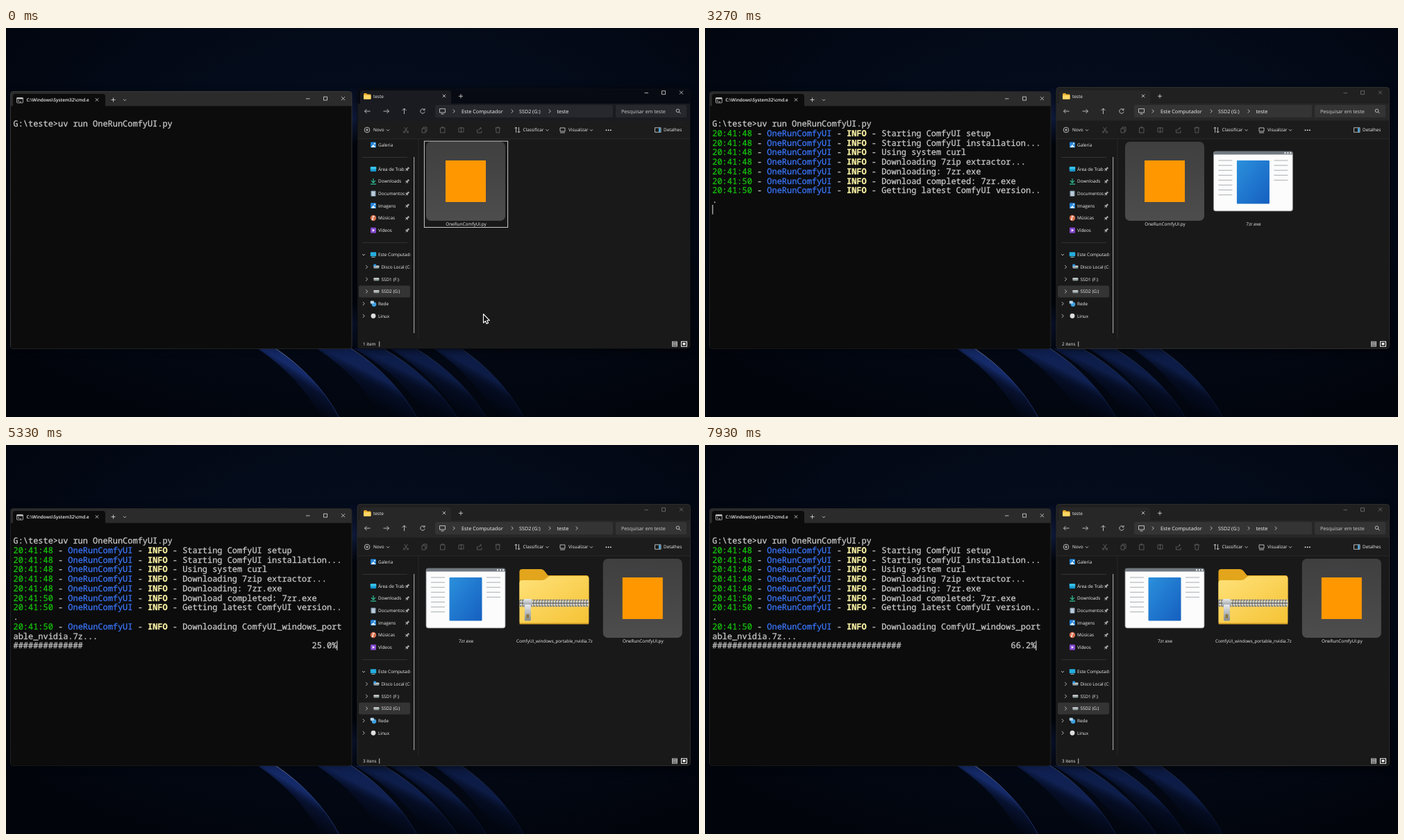
An HTML page for the animation above (8000 ms loop, 998 by 561 pixels).

```html
<!DOCTYPE html>
<html lang="pt">
<head>
<meta charset="utf-8">
<style>
html, body { margin: 0; width: 100%; height: 100%; overflow: hidden; background: #020610; }
svg { display: block; width: 998px; height: 561px; text-rendering: geometricPrecision; }
.ui { font-family: "Open Sans", "Noto Sans", sans-serif; fill: #f2f2f2; }
.mono { font-family: "Noto Sans Mono", "DejaVu Sans Mono", monospace; font-size: 11.945px;
  color: #ccc; fill: currentColor; stroke: currentColor; stroke-width: .25; }
.line { fill: none; stroke: #ddd; stroke-width: .8; }
.dim { stroke: #666; }
</style>
</head>
<body>
<svg id="stage" viewBox="0 0 998 561">
  <defs>
    <radialGradient id="sky" cx=".55" cy=".35" r=".75">
      <stop stop-color="#061023"/><stop offset=".6" stop-color="#030916"/><stop offset="1" stop-color="#01040b"/>
    </radialGradient>
    <linearGradient id="petal" x1=".4" y1=".72" x2=".62" y2=".42">
      <stop stop-color="#081336" stop-opacity="0"/><stop offset=".7" stop-color="#0b1842" stop-opacity=".6"/>
      <stop offset="1" stop-color="#152a68"/>
    </linearGradient>
    <linearGradient id="rim" gradientUnits="userSpaceOnUse" x1="0" y1="463" x2="0" y2="561">
      <stop stop-color="#8492bd"/><stop offset=".4" stop-color="#33498c"/><stop offset="1" stop-color="#1c3275"/>
    </linearGradient>
    <linearGradient id="gap" x2="0" y2="1">
      <stop stop-color="#060d20"/><stop offset=".12" stop-color="#14244f"/><stop offset=".22" stop-color="#03070f"/>
      <stop offset=".82" stop-color="#03070f"/><stop offset=".9" stop-color="#0c1736"/><stop offset="1" stop-color="#040914"/>
    </linearGradient>
    <linearGradient id="tile" x2="0" y2="1"><stop stop-color="#3f3f3f"/><stop offset="1" stop-color="#4d4d4d"/></linearGradient>
    <linearGradient id="blue" x2="1" y2="1"><stop stop-color="#2b90dc"/><stop offset="1" stop-color="#155fc0"/></linearGradient>
    <linearGradient id="yellow" x2="1" y2="1"><stop stop-color="#ffe27a"/><stop offset="1" stop-color="#f5c234"/></linearGradient>
    <linearGradient id="steel" x2="0" y2="1"><stop stop-color="#e8eaec"/><stop offset="1" stop-color="#858b91"/></linearGradient>
    <filter id="soft"><feGaussianBlur stdDeviation="7"/></filter>
    <clipPath id="pinned"><path d="M507 160h67v300h-67z"/></clipPath>
    <clipPath id="tree"><path d="M507 160h75.500v300h-75.500z"/></clipPath>
  </defs>
</svg>
<script>
const stage = document.getElementById('stage');
const COL = 7.167, ROW = 13.72, LEFT = 10.5, BASE = 142.3;

const rect = (x, y, w, h, fill, r = 0, extra = '') =>
  `<rect x="${x}" y="${y}" width="${w}" height="${h}" fill="${fill}" rx="${r}" ${extra}/>`;
const line = (d, cls = '') => `<path class="line ${cls}" d="${d}"/>`;
const group = (id, body, extra = '') => `<g id="${id}" ${extra}>${body}</g>`;
const label = (x, y, s, size = 6.4, extra = '') =>
  `<text class="ui" x="${x}" y="${y + size * .36}" font-size="${size}" ${extra}>${s}</text>`;
const mono = (col, row, s, extra = '') =>
  `<text class="mono" x="${LEFT + col * COL}" y="${BASE + row * ROW}" ${extra}>${s}</text>`;
const cross = (x, y, r) => line(`M${x - r} ${y - r}l${2 * r} ${2 * r}m0 ${-2 * r}l${-2 * r} ${2 * r}`);
const plus = (x, y) => line(`M${x - 3} ${y}h6m-3 -3v6`);
const chevron = (x, y) => line(`M${x - 1.2} ${y - 2.5}l2.5 2.500l-2.500 2.500`);
const down = (x, y) => line(`M${x - 2} ${y - 1}l2 2l2 -2`);

// Each petal: top x, bottom x, width of its glow, strength.
function wallpaper() {
  const petals = [[388, 480, 26, 1], [497, 592, 50, .75], [543, 650, 42, .65], [590, 692, 38, .6], [655, 746, 40, .6]];
  const edge = (a, b) => `Q${a + (b - a) * .66} 503 ${b} 562`;
  return rect(0, 0, 998, 561, 'url(#sky)') + rect(496, 85, 14, 380, 'url(#gap)') +
    petals.map(([a, b, w, strength]) =>
      `<g opacity="${strength}">
        <path fill="url(#petal)" d="M${a} 462${edge(a, b)}H${b - w}Q${a + (b - a) * .66 - w} 503 ${a - w} 462z"/>
        <path fill="none" stroke="url(#rim)" stroke-width=".8" opacity="${strength}" d="M${a} 462${edge(a, b)}"/></g>`).join('') +
    rect(506, 90, 479, 374, '#000', 4, 'filter="url(#soft)" opacity=".75"') +
    rect(7, 94, 491, 369, '#000', 4, 'filter="url(#soft)" opacity=".4"');
}

function terminal() {
  return rect(6.5, 91.5, 491.500, 371, '#2b2b2b', 4, 'id="termFrame" stroke="#444" stroke-width=".8"') +
    `<path fill="#0c0c0c" d="M7 112.500H497.500V459q0 3.500-3.500 3.500H10.500q-3.500 0-3.500-3.500z"/>
     <path fill="#0c0c0c" d="M10 113V99q0-4 4-4H139q4 0 4 4v14z"/>` +
    rect(15.5, 100.5, 9, 7.5, '#111', 1, 'stroke="#bbb" stroke-width=".8"') +
    rect(15.5, 100.5, 9, 2, '#ccc') + line('M17 104l1.500 1.200l-1.500 1.200m2.500 .2h2.500') +
    label(29.5, 104, 'C:\\Windows\\System32\\cmd.e', 6.45, 'font-weight="600"') +
    cross(131, 103.5, 2.2) + plus(154.5, 103.5) + down(171, 103.8) +
    line('M432 102h5.500M457.500 99.200h5v5h-5z') + cross(485.5, 101.7, 2.5) +
    mono(0, 0, 'G:\\teste&gt;uv run OneRunComfyUI.py');
}

const entry = (row, time, msg) =>
  mono(0, row, time, 'style="color:#16c60c"') + mono(9, row, '-') +
  mono(11, row, 'OneRunComfyUI', 'style="color:#3b78ff"') + mono(25, row, '-') +
  mono(27, row, 'INFO', 'style="color:#f9f1a5" font-weight="600"') + mono(32, row, '-') + mono(34, row, msg);

function log() {
  const setup = ['Starting ComfyUI setup', 'Starting ComfyUI installation...', 'Using system curl',
    'Downloading 7zip extractor...', 'Downloading: 7zr.exe'];
  return group('setup', setup.map((s, i) => entry(i + 1, '20:41:48', s)).join('')) +
    group('ready', entry(6, '20:41:50', 'Download completed: 7zr.exe') +
      entry(7, '20:41:50', 'Getting latest ComfyUI version..') + mono(0, 8, '.')) +
    group('fetch', entry(9, '20:41:50', 'Downloading ComfyUI_windows_port') + mono(0, 10, 'able_nvidia.7z...')) +
    group('progress', mono(0, 11, '', 'id="bar"') + mono(65, 11, '', 'id="percent" text-anchor="end"')) +
    rect(0, 0, 1, 13.7, '#eee', 0, 'id="caret"');
}

function icon(kind, x, y) {
  const at = s => `<g transform="translate(${x} ${y})">${s}</g>`;
  const drive = rect(-4, -1.8, 8, 4, '#9a9ea3', 1) + rect(-4, -1.8, 8, 1.5, '#d7dadd', .7) + rect(1.5, .6, 1.5, .8, '#3fd07c');
  return at({
    picture: rect(-4, -4, 8, 8, '#2584d8', 1) + '<path fill="#e4f3ff" d="M-3.500 3.500L0-.5L3.500 3.500z"/><circle cx="1.800" cy="-1.800" r="1" fill="#fff"/>',
    desktop: rect(-4.2, -3.5, 8.4, 7, '#1597cf', 1) + rect(-4.2, -3.5, 8.4, 4, '#35bfe8', 1),
    download: '<path fill="none" stroke="#2fbf95" stroke-width="1.200" d="M0-4V2M-3-1L0 2L3-1M-4 4H4"/>',
    document: rect(-3.5, -4, 7, 8, '#90a9bd', 1) + '<path stroke="#fff" d="M-2-1.500h4M-2 .5h4M-2 2.500h4" stroke-width=".8"/>',
    music: '<circle r="4.200" fill="#d9704f"/><path d="M-.5 2V-2.500L2-1.800" fill="none" stroke="#fff"/><circle cx="-1.200" cy="2" r="1.100" fill="#fff"/>',
    video: rect(-4, -4, 8, 8, '#8448cf', 1) + '<path fill="#fff" d="M-1.200-2L2.200 0L-1.200 2z"/>',
    pc: rect(-4.2, -3.8, 8.4, 6, '#24aee0', .8) + rect(-2.5, 3, 5, 1, '#9bb'),
    disk: drive + rect(-4, -4, 3.5, 3, '#2a9be8'),
    drive,
    net: '<circle cx="1" cy="1" r="3.300" fill="#3d9fe0"/>' + rect(-4.2, -4, 5, 4, '#b9d9ee', .6),
    dot: '<circle r="3.400" fill="#dedede"/>'
  }[kind]);
}

const pin = y => `<path transform="translate(578 ${y}) rotate(45)" fill="#aaa" d="M-1.500-3h3v.8h-.5v2l1.300 1.200v.8h-2v2.200h-.6v-2.200h-2v-.8l1.300-1.200v-2h-.5z"/>`;

function sidebar() {
  const pins = ['desktop Área de Trabalho', 'download Downloads', 'document Documentos', 'picture Imagens', 'music Músicas', 'video Vídeos'];
  const split = s => [s.slice(0, s.indexOf(' ')), s.slice(s.indexOf(' ') + 1)];
  const places = ['pc Este Computador', 'disk Disco Local (C:)', 'drive SSD1 (F:)', 'drive SSD2 (G:)', 'net Rede', 'dot Linux'];
  return icon('picture', 529, 168.5) + label(536, 168.5, 'Galeria') +
    pins.map((s, i) => {
      const [kind, name] = split(s), y = 203.4 + i * 17.65;
      return icon(kind, 529, y) + `<g clip-path="url(#pinned)">${label(536, y, name)}</g>` + pin(y);
    }).join('') +
    rect(508, 371.5, 74, 17, '#343434', 2) +
    places.map((s, i) => {
      const [kind, name] = split(s), y = 327 + i * 17.65, child = i > 0 && i < 4 ? 4.4 : 0;
      return (i ? chevron(515 + child, y) : down(515, y)) + icon(kind, 529 + child, y) +
        `<g clip-path="url(#tree)">${label(536 + child, y, name)}</g>`;
    }).join('') +
    rect(513, 186, 65, .8, '#3a3a3a') + rect(513, 309.3, 65, .8, '#3a3a3a') +
    rect(587, 186, 1.2, 254, '#9c9c9c') + rect(593.5, 160, .8, 287, '#2c2c2c');
}

function toolbar() {
  const arrow = 'M516.500 120h8m-8 0l3-3m-3 3l3 3M551.500 120h-8m8 0l-3-3m3 3l-3 3M573.500 124v-8m0 0l-3 3m3-3l3 3';
  return line(arrow) + line('M602.500 118a3.200 3.200 0 1 0 .6 2.600M603 116v2.300h-2.300') +
    line('M624.500 116.500h8v5.500h-8zM626.500 124h4') +
    [645, 729, 783].map(x => chevron(x, 120)).join('') +
    label(656, 120, 'Este Computador', 7.35) + label(739, 120, 'SSD2 (G:)', 7.2) + label(793.5, 120, 'teste', 7.35) +
    label(886, 120, 'Pesquisar em teste', 7.2, 'style="fill:#ccc"') +
    '<circle class="line" cx="967.500" cy="119.300" r="2.300"/>' + line('M969.300 121l2.300 2.300') +
    '<circle class="line" cx="520" cy="147" r="3.800"/>' + line('M518 147h4m-2-2v4') +
    label(529, 147, 'Novo') + down(550, 147.3) +
    line('M573.500 143l4 6M578.500 143l-4 6', 'dim') + '<circle class="line dim" cx="573.500" cy="150" r="1.200"/><circle class="line dim" cx="578.500" cy="150" r="1.200"/>' +
    line('M599 145h5v6h-5zM601 145v-2h5v6h-2M625.500 144h6.500v7h-6.500zM627.500 144v-1.200h2.500v1.200M652 144h7v6h-7zM655.500 143v8M678.500 146v5h6.500v-3M680.500 148q0-3.500 4-3.500m-1.500-1.500l1.500 1.500l-1.500 1.500M704.500 144h7.500M705.500 144l.5 7h4.500l.5-7M707 144v-1h2.500v1', 'dim') +
    line('M734.500 151v-8m-2 2l2-2l2 2M738.500 143v8m-2-2l2 2l2-2') + label(744.500, 147, 'Classificar') + down(779.5, 147.3) +
    line('M798 144h7v5h-7zM798 151h7') + label(810, 147, 'Visualizar') + down(843, 147.3) +
    [864.5, 867.7, 870.9].map(x => `<circle cx="${x}" cy="147.300" r=".9" fill="#fff"/>`).join('') +
    line('M934.500 143.800h8.500v6.500h-8.500z') + rect(940, 144.2, 2.600, 5.7, '#4aa3d8') + label(947, 147, 'Detalhes');
}

const script = group('script',
  rect(-57, -57, 114, 114, 'url(#tile)', 7) + rect(-29, -30, 58, 60, '#ff9800') +
  label(.5, 61.5, 'OneRunComfyUI.py', 6.4, 'text-anchor="middle"'));

const ticks = (x, n) => Array.from({ length: n }, (_, i) => rect(x, -30.5 + i * 7.1, 20, 1, '#a9adb1')).join('');
const program = group('program',
  rect(-57, -43, 114, 86, '#fcfcfc', 3, 'stroke="#85898d" stroke-width=".8"') +
  '<path fill="#717980" d="M-57-38.500v-2q0-2.500 2.500-2.500h109q2.500 0 2.500 2.500v2z"/>' +
  [45, 49, 53].map(x => rect(x, -41.7, 2, 2, '#fff')).join('') +
  ticks(-50, 8) + ticks(30, 5) + rect(-23.5, -30, 47, 62.5, 'url(#blue)', 1) +
  label(.5, 61.5, '7zr.exe', 6.4, 'text-anchor="middle"'));

const archive = group('archive',
  `<path fill="#e2a51c" d="M-50-38q0-4 4-4h27q3 0 5 2.500l5 6.500h55q4 0 4 4v40h-100z"/>
   <path fill="url(#yellow)" d="M-50-22q0-4 4-4h29q3 0 5-2l3-2.500q1.500-1.500 4-1.500h51q4 0 4 4v62q0 3-3 3h-94q-3 0-3-3z"/>` +
  rect(-50, 35.5, 100, 2, '#dba52b', 1) + rect(-50, 1, 100, 12, '#e5c469') +
  '<path stroke="#6c7176" stroke-width="10" stroke-dasharray="2.500 1.500" d="M-50 7H50"/>' +
  '<path stroke="#d5d8da" stroke-width="7" stroke-dasharray="2.500 1.500" d="M-49 7H50"/>' +
  rect(-50, 6.5, 100, 1.2, '#555') + rect(-44, 1, 12, 12, 'url(#steel)', 2) +
  rect(-42.5, 9, 9, 23.5, 'url(#steel)', 1.5) + rect(-40, 23, 4, 6, '#8d7a42', 1) +
  label(.5, 61.5, 'ComfyUI_windows_portable_nvidia.7z', 6.28, 'text-anchor="middle"'));

function explorer() {
  return rect(506, 85.5, 479.5, 377, '#202020', 4, 'id="frame" stroke="#333" stroke-width=".8"') +
    '<path id="tab" d="M506.500 134V109H510V94q0-4 4-4H637q4 0 4 4v15H985v25z"/>' +
    rect(506.5, 133.5, 478.500, 26.5, '#1c1c1c') +
    '<path fill="#191919" d="M506.500 160H985v298.500q0 3.500-3.500 3.500H510q-3.500 0-3.500-3.500z"/>' +
    rect(507, 159.6, 478, .7, '#303030') +
    rect(618, 111, 256, 18, '#fff', 2, 'opacity=".06"') + rect(878, 111, 102, 18, '#fff', 2, 'opacity=".06"') +
    '<path fill="#e9a92a" d="M515 95.500q0-1.500 1.500-1.500h2.500l1.500 1.500h4q1 0 1 1v6h-10.500z"/>' + rect(515, 96.8, 10.5, 6, '#ffd866', 1) +
    label(529, 98.5, 'teste') + cross(631, 98, 2.2) + plus(655, 98.3) +
    group('buttons', line('M919.500 93.700h5.500M944.500 90.700h5v5h-5z') + cross(972.5, 93, 2.5)) +
    toolbar() + group('crumb', chevron(822, 120)) + sidebar() +
    rect(602.4, 163.2, 120.2, 124.3, 'none', 0, 'id="focus" stroke="#c8c8c8"') +
    script + program + archive +
    label(514, 455.7, '', 6.3, 'id="count"') + rect(537.3, 452, .9, 7.5, '#ccc') +
    rect(959.5, 452.2, 7, 7, '#555', 0, 'stroke="#ccc" stroke-width=".8"') + line('M960 454.500h6.500m-6.500 2.300h6.500') +
    rect(972.5, 452.2, 8, 7, '#111', 0, 'stroke="#fff"') + rect(974.5, 454, 4, 3.2, '#fff');
}

const pointer = '<path id="pointer" fill="#111" stroke="#fff" stroke-width="1.100" stroke-linejoin="round" d="M687.500 412.500v12.800l2.900-2.600l1.800 3.900l2.300-1l-1.800-3.900h3.600z"/>';

stage.insertAdjacentHTML('beforeend', wallpaper() + terminal() + log() + explorer() + pointer);

const $ = id => document.getElementById(id);
const show = (id, on) => $(id).setAttribute('visibility', on ? 'visible' : 'hidden');
const set = (id, name, value) => $(id).setAttribute(name, value);
const place = (id, slot) => set(id, 'transform', `translate(${662 + slot * 127.4} 221)`);

const DURATION = 8000;
const FOCUS = 270, SETUP = 1130, READY = 3130, FETCH = 3600, TRANSFER = 4000, LISTED = 4070;
const speed = [[4000, 0], [4200, 3.8], [5330, 25], [7200, 56.7], [7930, 66.2], [8000, 67.1]];

function percentAt(t) {
  const i = Math.max(1, speed.findIndex(k => t <= k[0]));
  const [t0, a] = speed[i - 1], [t1, b] = speed[i];
  return a + (b - a) * (t - t0) / (t1 - t0);
}

function caret(t) {
  const on = t >= TRANSFER || (t >= SETUP && t < 1670) || (t >= 2200 && t < 2870) || (t >= READY && t < 3800);
  const [col, row] = t >= TRANSFER ? [65, 11] : t >= FETCH ? [0, 11] : t >= READY ? [0, 9] : [0, 6];
  set('caret', 'x', LEFT + col * COL);
  set('caret', 'y', BASE + row * ROW - 10.8);
  show('caret', on);
}

function draw(t) {
  const browsing = t < FOCUS, listed = t >= LISTED, found = t >= READY;
  show('pointer', browsing);
  show('focus', browsing);
  set('frame', 'fill', browsing ? '#070a12' : '#202020');
  set('frame', 'y', browsing ? 88 : 85.5);
  set('frame', 'height', browsing ? 374.5 : 377);
  set('frame', 'stroke', browsing ? '#0e1016' : '#333');
  set('tab', 'fill', browsing ? '#191b20' : '#272727');
  set('buttons', 'opacity', browsing ? 1 : .45);
  set('termFrame', 'stroke', browsing ? '#404040' : '#242424');

  show('setup', t >= SETUP);
  show('ready', found);
  show('fetch', t >= FETCH);
  show('progress', t >= TRANSFER);
  if (t >= TRANSFER) {
    const p = percentAt(t);
    $('bar').textContent = '#'.repeat(Math.floor(p * .58));
    $('percent').textContent = p.toFixed(1) + '%';
  }
  caret(t);

  show('program', found);
  show('archive', listed);
  show('crumb', listed);
  place('script', listed ? 2 : 0);
  place('program', listed ? 0 : 1);
  place('archive', 1);
  $('count').textContent = listed ? '3 itens' : found ? '2 itens' : '1 item';
}

const start = performance.now();
function tick() {
  draw((performance.now() - start) % DURATION);
  requestAnimationFrame(tick);
}
tick();
</script>
</body>
</html>
```
